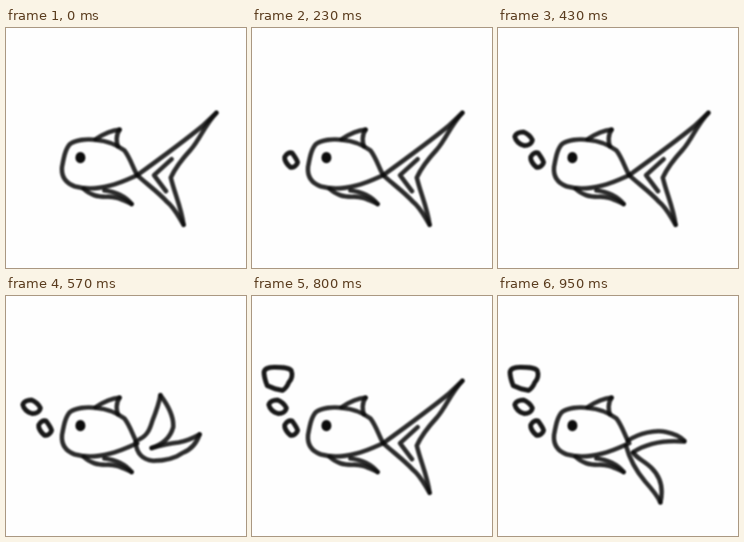
Write an HTML page that moves like this. It is 300 by 300 pixels and loops after 1010 ms.

```html
<!DOCTYPE html>
<html lang="en">
<head>
<meta charset="utf-8">
<title>Fish</title>
<style>
  html, body { margin: 0; width: 100%; height: 100%; overflow: hidden; background: #fefefe; }
  svg { display: block; width: 100vw; height: 100vh; }
  path {
    fill: none; stroke: #0c0c0c; stroke-opacity: .87; stroke-width: 5.6;
    stroke-linecap: round; stroke-linejoin: round;
  }
  .bubble path { stroke-width: 6; stroke-opacity: .95; }
  .tail, .bubble { visibility: hidden; animation: 1010ms step-end infinite; }
  .spread { animation-name: spread; }
  .down { animation-name: down; }
  .up { animation-name: up; }
  .small { animation-name: small; }
  .medium { animation-name: medium; }
  .large { animation-name: large; }

  /* Pose changes at 140, 290, 430, 570, 710 and 860 ms */
  @keyframes spread {
    0%, 42.574%, 70.297% { visibility: visible; }
    28.713%, 56.436%, 85.149%, 100% { visibility: hidden; }
  }
  @keyframes down {
    0%, 42.574% { visibility: hidden; }
    28.713%, 85.149%, 100% { visibility: visible; }
  }
  @keyframes up {
    0%, 70.297%, 100% { visibility: hidden; }
    56.436% { visibility: visible; }
  }
  @keyframes small { 0% { visibility: hidden; } 13.861%, 100% { visibility: visible; } }
  @keyframes medium { 0% { visibility: hidden; } 28.713%, 100% { visibility: visible; } }
  @keyframes large { 0% { visibility: hidden; } 70.297%, 100% { visibility: visible; } }
</style>
</head>
<body>
<svg viewBox="0 0 300 300">
  <defs>
    <filter id="soft" filterUnits="userSpaceOnUse" x="0" y="0" width="300" height="300" color-interpolation-filters="sRGB">
      <feGaussianBlur stdDeviation=".95"/>
    </filter>
  </defs>
  <g filter="url(#soft)">
    <g class="body">
      <path d="M164 184C158 173 155 162 148 153C137 145 126 141 113 140C101 138 87 140 80 145C74 151 72 163 70 174C69 186 75 194 86 198C100 202 115 201 130 197C143 194 153 189 164 184"/>
      <path d="M112 139C121 133 131 128 142 127"/>
      <path d="M142 127C137 134 138 143 140 148"/>
      <path d="M97 201C106 209 114 211 125 211C138 210 146 215 157 220"/>
      <path d="M157 220C149 210 139 205 123 203"/>
      <ellipse cx="93" cy="162" rx="6.3" ry="7" fill="#0c0c0c"/>
    </g>
    <g class="tail spread">
      <path d="M164 184C193 163 223 141 245 123L263 106"/>
      <path d="M263 106C248 122 243 138 231 152C219 165 211 176 206 187C211 208 219 224 222 246"/>
      <path d="M222 246C215 235 211 225 201 217C190 205 176 195 164 184"/>
      <path d="M207 164L185 184L200 204"/>
    </g>
    <g class="tail down">
      <path d="M162 181C177 171 197 167 210 170C220 172 228 176 233 181"/>
      <path d="M233 182C210 180 188 183 169 195"/>
      <path d="M160 187C165 206 173 219 184 232C193 242 199 249 203 258"/>
      <path d="M203 258C207 241 203 226 192 215C183 206 175 204 169 196"/>
    </g>
    <g class="tail up">
      <path d="M167 179C177 174 180 166 183 156C187 146 191 136 193 124"/>
      <path d="M193 124C202 136 210 151 209 164C206 175 197 185 182 190"/>
      <path d="M182 190C196 186 206 184 216 183C227 181 235 177 242 173"/>
      <path d="M242 173C238 185 231 192 221 196C210 204 197 206 184 206C172 205 163 198 162 182"/>
    </g>
    <g class="bubble small">
      <path d="M41 161C43 157 47 155 50 156C53 160 56 164 57 168C56 172 52 175 48 174C44 171 40 165 41 161Z"/>
    </g>
    <g class="bubble medium">
      <path d="M21 136C22 132 27 130 32 130C37 132 41 136 43 140C42 145 37 147 33 147C27 146 22 141 21 136Z"/>
    </g>
    <g class="bubble large">
      <path d="M15 95C16 90 22 89 28 89C36 89 45 89 49 93C51 98 50 104 46 108C44 113 42 116 38 118C31 117 25 115 19 112C17 107 15 101 15 95Z"/>
    </g>
  </g>
</svg>
</body>
</html>
```
